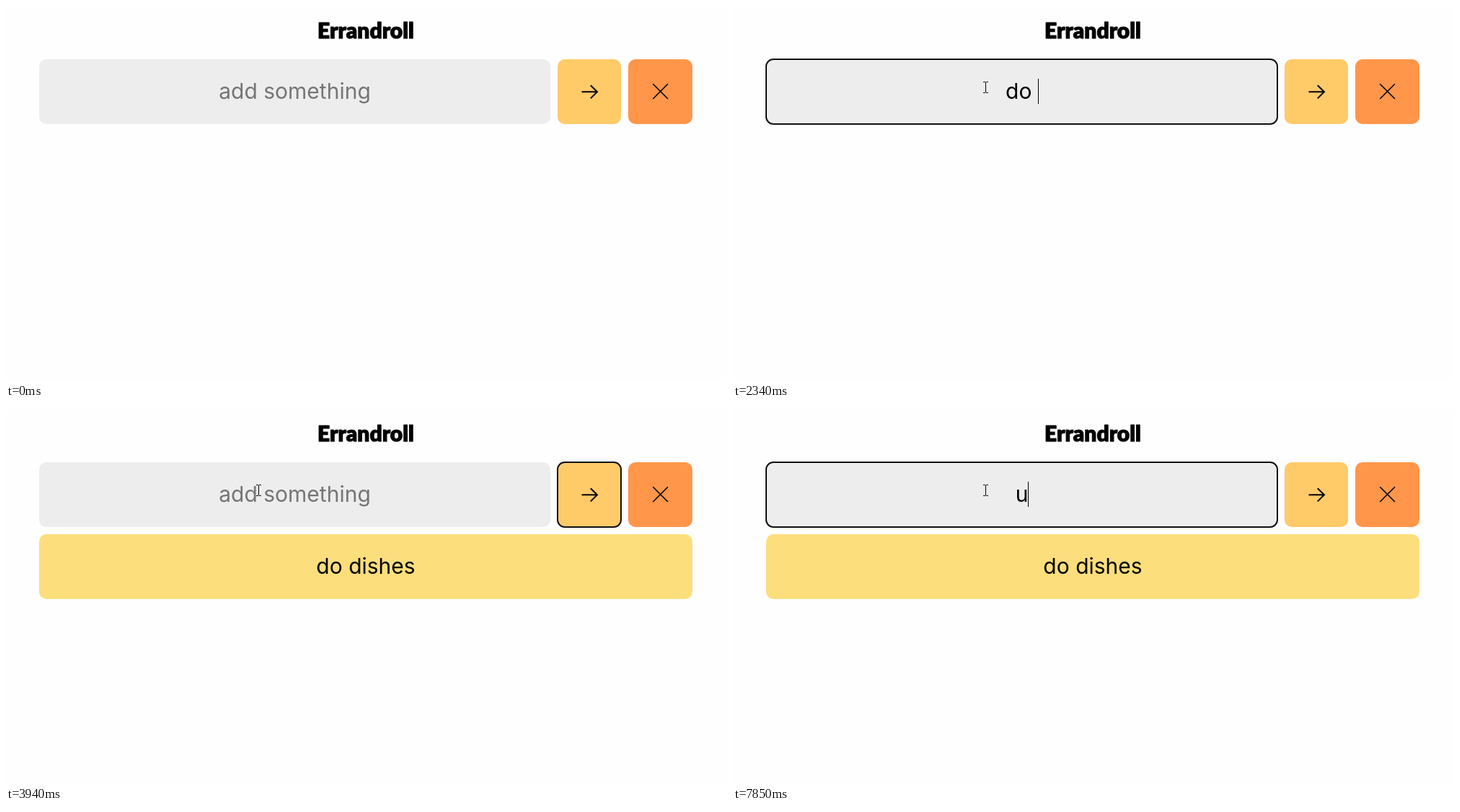
Animation of 1000 by 521 pixels, one loop 7.99 s. Source, as an HTML page with a canvas:

```html
<!DOCTYPE html>
<html lang="en">
<head>
<meta charset="utf-8">
<title>Errandroll</title>
<style>
  html, body { margin: 0; width: 100%; height: 100%; overflow: hidden; background: #fefefe; }
  canvas { display: block; width: 1000px; height: 521px; }
</style>
</head>
<body>
<canvas id="stage" width="1000" height="521"></canvas>
<script>
const ctx = document.getElementById('stage').getContext('2d');
const LOOP = 7990;
const INK = '#000';
const BODY_FONT = '400 30px Inter, "Open Sans", sans-serif';
const TITLE_FONT = '900 30px Lato, "Open Sans", sans-serif';

// Each entry changes part of the state from its time on.
const script = [
  [0, { cursor: null, focus: '', text: '', caret: false, click: false, item: '', locked: false }],
  [520, { cursor: ['arrow', 872, 493] }],
  [590, { cursor: ['arrow', 640, 330] }],
  [660, { cursor: ['arrow', 425, 182] }],
  [730, { cursor: ['beam', 354, 130] }],
  [870, { cursor: ['beam', 350, 113] }],
  [1000, { focus: 'input', caret: true, click: true }],
  [1130, { click: false }],
  [1550, { caret: false }],
  [2080, { caret: true }],
  [2130, { text: 'd' }],
  [2190, { text: 'do' }],
  [2340, { text: 'do ' }],
  [2470, { text: 'do d' }],
  [2610, { text: 'do di' }],
  [2660, { text: 'do dis' }],
  [2880, { text: 'do dish' }],
  [2930, { text: 'do dishe' }],
  [3070, { text: 'do dishes' }],
  [3470, { focus: 'add', caret: false, locked: true }],
  [3940, { text: '', item: 'do dishes', locked: false }],
  [5670, { focus: 'input', caret: true, click: true }],
  [5810, { click: false }],
  [6270, { caret: false }],
  [6730, { caret: true }],
  [7320, { caret: false }],
  [7790, { caret: true }],
  [7850, { text: 'u' }]
];

function stateAt(t) {
  const state = {};
  for (const [start, change] of script) if (start <= t) Object.assign(state, change);
  return state;
}

function box(x, y, w, h, color, focused) {
  ctx.beginPath();
  ctx.roundRect(x, y, w, h, 10);
  ctx.fillStyle = color;
  ctx.fill();
  if (focused) stroke(2, '#101010');
}

function stroke(width, color = INK) {
  ctx.lineWidth = width;
  ctx.strokeStyle = color;
  ctx.stroke();
}

function polyline(...points) {
  points.forEach(([x, y], i) => i ? ctx.lineTo(x, y) : ctx.moveTo(x, y));
}

function label(text, x, y, color = INK) {
  ctx.font = BODY_FONT;
  ctx.textAlign = 'center';
  ctx.fillStyle = color;
  ctx.fillText(text, x, y);
}

function drawTitle() {
  ctx.font = TITLE_FONT;
  ctx.textAlign = 'center';
  ctx.fillStyle = INK;
  ctx.lineJoin = 'round';
  ctx.lineWidth = 1;
  ctx.strokeStyle = INK;
  ctx.fillText('Errandroll', 499, 45);
  ctx.strokeText('Errandroll', 499, 45);
  ctx.lineJoin = 'miter';
}

function drawInput(s) {
  const mid = 400.5, base = 129;
  box(46, 74, 709, 90, '#ededed', s.focus === 'input');
  if (s.text) label(s.text, mid, base, s.locked ? '#a1a1a1' : INK);
  else if (s.focus !== 'input') label('add something', mid, base, '#757575');
  if (s.caret) {
    ctx.font = BODY_FONT;
    const x = Math.floor(mid + ctx.measureText(s.text).width / 2 + 0.5);
    ctx.fillStyle = INK;
    ctx.fillRect(x, 101, 1, 35);
  }
}

function drawButtons(s) {
  box(765, 74, 88, 90, '#ffca68', s.focus === 'add');
  ctx.beginPath();
  polyline([798.5, 119.3], [820, 119.3]);
  polyline([810.8, 110.2], [820, 119.3], [810.8, 128.4]);
  stroke(2);
  box(863, 74, 89, 90, '#ff964a');
  ctx.beginPath();
  polyline([897.3, 108.3], [918, 129]);
  polyline([918, 108.3], [897.3, 129]);
  stroke(1.6);
}

function drawArrow(x, y) {
  ctx.beginPath();
  polyline([x + .5, y + .5], [x + .5, y + 16.5], [x + 4, y + 13], [x + 6.5, y + 18.5],
    [x + 8.5, y + 17.5], [x + 6.5, y + 12], [x + 11.5, y + 12]);
  ctx.closePath();
  ctx.fillStyle = '#fff';
  ctx.fill();
  stroke(1);
}

function drawBeam(x, y) {
  ctx.fillStyle = INK;
  ctx.fillRect(x, y - 7, 1, 14);
  for (const end of [y - 8, y + 7]) {
    ctx.fillRect(x - 3, end, 3, 1);
    ctx.fillRect(x + 1, end, 3, 1);
  }
}

function draw(t) {
  const s = stateAt(t);
  ctx.fillStyle = '#fefefe';
  ctx.fillRect(0, 0, 1000, 521);
  drawTitle();
  drawInput(s);
  drawButtons(s);
  if (s.item) {
    box(46, 174, 906, 90, '#fcde7c');
    label(s.item, 499, 229);
  }
  if (s.click) {
    ctx.beginPath();
    ctx.arc(348, 112, 12, 0, Math.PI * 2);
    ctx.fillStyle = '#f7f57a';
    ctx.fill();
  }
  if (s.cursor) {
    const [shape, x, y] = s.cursor;
    (shape === 'arrow' ? drawArrow : drawBeam)(x, y);
  }
}

const began = performance.now();
function tick() {
  draw((performance.now() - began) % LOOP);
  requestAnimationFrame(tick);
}
tick();
</script>
</body>
</html>
```
